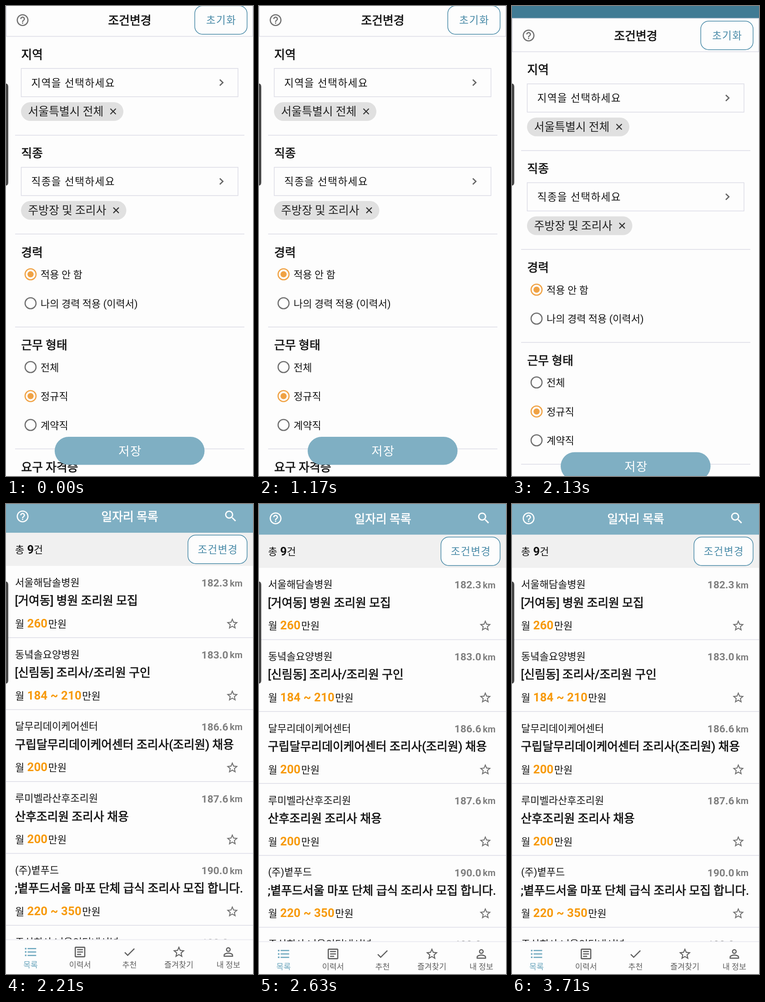
These frames come from a looping animation (543 px wide and 1031 px high, 3.75 s). An HTML page:

```html
<!DOCTYPE html>
<html lang="ko">
<head>
<meta charset="utf-8">
<title>일자리 목록</title>
<style>
html, body { margin: 0; width: 100%; height: 100%; overflow: hidden; background: #fdfdfd; }
svg { display: block; width: 543px; height: 1031px; }
text { font-family: Roboto, "Noto Sans CJK KR", "Noto Sans KR", sans-serif; white-space: pre; }
.m { stroke: currentColor; stroke-width: .75px; }
.b { font-weight: 700; }
.line { stroke: #dcdce6; stroke-width: 1.5; fill: none; }
#form, #list, #hand, .view { animation: 3750ms infinite; }
.view, #hand { animation-timing-function: step-end; }
#form { animation-name: drop; }
#list { animation-name: rise; }
#formView { animation-name: formOn; }
#listView { animation-name: listOn; }
#hand { animation-name: handOn; }
@keyframes drop {
  0%, 51.73% { transform: none; animation-timing-function: cubic-bezier(.4, 0, .2, 1); }
  63.07%, 100% { transform: translateY(48px); }
}
@keyframes rise {
  0%, 51.73% { transform: translateY(-44px); animation-timing-function: cubic-bezier(.4, 0, .2, 1); }
  63.07%, 100% { transform: none; }
}
@keyframes formOn { 0% { visibility: visible; } 57.33%, 100% { visibility: hidden; } }
@keyframes listOn { 0% { visibility: hidden; } 57.33%, 100% { visibility: visible; } }
@keyframes handOn { 0% { opacity: 0; } 40.5% { opacity: 1; } 52.3%, 100% { opacity: 0; } }
</style>
</head>
<body>
<svg id="stage" viewBox="0 0 543 1031"></svg>
<script>
const INK = '#141414', GRAY = '#707070', BLUE = '#7fafc3', EDGE = '#4a8ba8', ORANGE = '#f0a244';

const ICON = {
  help: 'M11 18h2v-2h-2v2zm1-16C6.48 2 2 6.48 2 12s4.48 10 10 10 10-4.48 10-10S17.52 2 12 2zm0 18c-4.41 0-8-3.59-8-8s3.59-8 8-8 8 3.59 8 8-3.59 8-8 8zm0-14c-2.21 0-4 1.79-4 4h2c0-1.1.9-2 2-2s2 .9 2 2c0 2-3 1.75-3 5h2c0-2.25 3-2.5 3-5 0-2.21-1.79-4-4-4z',
  search: 'M15.5 14h-.79l-.28-.27C15.41 12.59 16 11.11 16 9.5 16 5.91 13.09 3 9.5 3S3 5.91 3 9.5 5.91 16 9.5 16c1.61 0 3.09-.59 4.23-1.57l.27.28v.79l5 4.99L20.49 19zm-6 0C7.01 14 5 11.99 5 9.5S7.01 5 9.5 5 14 7.01 14 9.5 11.99 14 9.5 14z',
  star: 'M22 9.24l-7.19-.62L12 2 9.19 8.63 2 9.24l5.46 4.73L5.82 21 12 17.27 18.18 21l-1.63-7.03zM12 15.4l-3.76 2.27 1-4.28-3.32-2.88 4.38-.38L12 6.1l1.71 4.04 4.38.38-3.32 2.88 1 4.28z',
  list: 'M2.5 5h2.5v2.5H2.5zM2.5 10.75h2.5v2.5H2.5zM2.5 16.5h2.5V19H2.5zM7 5.2h14.5v2H7zM7 11h14.5v2H7zM7 16.8h14.5v2H7z',
  article: 'M3 5a2 2 0 0 1 2-2h14a2 2 0 0 1 2 2v14a2 2 0 0 1-2 2H5a2 2 0 0 1-2-2zM5 5v14h14V5zM7 7h10v2H7zM7 11h10v2H7zM7 15h7v2H7z',
  check: 'M9 16.2L4.8 12l-1.4 1.4L9 19 21 7l-1.4-1.4z',
  person: 'M12 5.9a2.1 2.1 0 1 1 0 4.2 2.1 2.1 0 0 1 0-4.2m0 9c2.97 0 6.1 1.46 6.1 2.1v1.1H5.9V17c0-.64 3.13-2.1 6.1-2.1M12 4C9.79 4 8 5.79 8 8s1.79 4 4 4 4-1.79 4-4-1.79-4-4-4zm0 9c-2.67 0-8 1.34-8 4v3h16v-3c0-2.66-5.33-4-8-4z'
};

// Text is placed by its vertical centre.
function text(x, cy, size, str, { fill = INK, cls = '', anchor = 'start', gap = 0 } = {}) {
  return `<text x="${x}" y="${cy + size * .37}" font-size="${size}" fill="${fill}" color="${fill}" class="${cls}" text-anchor="${anchor}" letter-spacing="${gap}">${str}</text>`;
}
const head = (x, cy, str, opt) => text(x, cy, 25.8, str, { cls: 'm', ...opt });
const rect = (x, y, w, h, fill, rest = '') => `<rect x="${x}" y="${y}" width="${w}" height="${h}" fill="${fill}" ${rest}/>`;
const path = (d, color, width) => `<path d="${d}" fill="none" stroke="${color}" stroke-width="${width}"/>`;
const rule = (y, x1 = 20, x2 = 524) => `<path class="line" d="M${x1} ${y}H${x2}"/>`;
const icon = (name, cx, cy, k, fill = GRAY) =>
  `<path transform="translate(${cx} ${cy}) scale(${k}) translate(-12 -12)" fill="${fill}" fill-rule="evenodd" d="${ICON[name]}"/>`;

const outlineButton = (x, y, w, str) =>
  rect(x, y, w, 62.5, '#fdfdfd', `rx="17" stroke="${EDGE}" stroke-width="1.5"`) +
  text(x + w / 2 + .7, y + 31.5, 22.6, str, { fill: EDGE, anchor: 'middle', gap: 1.35 });

function picker(y, title, hint, chip, chipW) {
  const cx = 33 + chipW - 22.5, cy = y + 125.3;
  return head(33.5, y, title) +
    rect(33.5, y + 31, 476.5, 62, '#fdfdfd', 'class="line" style="fill:#fdfdfd"') +
    text(55.5, y + 62.3, 22.6, hint, { gap: 1.4 }) +
    path(`M470 ${y + 55.5}l6.8 6.5-6.8 6.5`, '#666', 2.7) +
    rect(33, y + 105, chipW, 41, '#e0e0e0', 'rx="20.5"') +
    text(48.5, y + 125, 24.8, chip, { fill: '#222' }) +
    path(`M${cx - 6} ${cy - 6}l12 12m0-12l-12 12`, '#333', 2.2) +
    rule(y + 177.5);
}

function radio(y, label, on) {
  const c = on ? ORANGE : GRAY;
  return `<circle cx="54" cy="${y}" r="12" fill="none" stroke="${c}" stroke-width="2.6"/>` +
    (on ? `<circle cx="54" cy="${y}" r="6.8" fill="${c}"/>` : '') +
    text(76, y + .5, 22, label);
}

const form =
  rect(0, -80, 543, 74, '#407b94') + rect(0, -7, 543, 1100, '#fdfdfd') +
  rect(.6, -6.4, 541.8, 73, '#fdfdfd', 'class="line" style="fill:#fdfdfd"') +
  icon('help', 36.5, 31, 1.3) +
  head(272, 31.5, '조건변경', { anchor: 'middle' }) +
  outlineButton(415, -.5, 115, '초기화') +
  picker(106, '지역', '지역을 선택하세요', '서울특별시 전체', 225) +
  picker(322.8, '직종', '직종을 선택하세요', '주방장 및 조리사', 231.5) +
  head(33.5, 540, '경력') +
  radio(588.5, '적용 안 함', true) + radio(652, '나의 경력 적용 (이력서)') + rule(704.3) +
  head(33.5, 743.5, '근무 형태') +
  radio(792, '전체') + radio(855.7, '정규직', true) + radio(919, '계약직') + rule(971.4) +
  head(33.5, 1011, '요구 자격증') +
  rect(107, 945, 329.5, 61.5, BLUE, 'rx="30.7"') +
  text(273, 976, 26.4, '저장', { fill: '#fff', anchor: 'middle', gap: 1.4 });

const jobs = [
  ['서울해담솔병원', '182.3', '[거여동] 병원 조리원 모집', '260'],
  ['동녘솔요양병원', '183.0', '[신림동] 조리사/조리원 구인', '184 ~ 210'],
  ['달무리데이케어센터', '186.6', '구립달무리데이케어센터 조리사(조리원) 채용', '200'],
  ['루미벨라산후조리원', '187.6', '산후조리원 조리사 채용', '200'],
  ['(주)볕푸드', '190.0', ';볕푸드서울 마포 단체 급식 조리사 모집 합니다.', '220 ~ 350'],
  ['주식회사 너울인터내셔널', '190.0', '', '']
];

const job = ([name, km, title, pay], i) => {
  const y = 140 + i * 157.8;
  return text(20, y + 36, 22, name) +
    text(488.5, y + 37, 22.8, km, { fill: '#808080', cls: 'b', anchor: 'end' }) +
    text(520, y + 37.5, 20, 'km', { fill: '#808080', cls: 'b', anchor: 'end' }) +
    head(19.5, y + 76, title) +
    text(20, y + 127, 22, '월') +
    text(46.5, y + 127, 22, `<tspan font-size="26" font-weight="700" fill="#f79a0c">${pay}</tspan><tspan dx="1.5">만원</tspan>`) +
    icon('star', 497.5, y + 127, 1.25) +
    rule(y + 157.4, 0, 543);
};

const tabs = [['list', '목록'], ['article', '이력서'], ['check', '추천'], ['star', '즐겨찾기'], ['person', '내 정보']];
const tab = ([name, label], i) => {
  const x = 54 + i * 108.7, c = i ? '#606060' : '#6ba6bd';
  return icon(name, x, 987, 1.3, c) + text(x, 1015, 17.4, label, { fill: c, anchor: 'middle' });
};

const list =
  rect(0, -10, 543, 1100, '#fdfdfd') + rect(0, -80, 543, 147.5, BLUE) +
  icon('help', 36.5, 31.5, 1.3, '#fff') +
  head(272, 32, '일자리 목록', { fill: '#fff', anchor: 'middle' }) +
  icon('search', 494, 31, 1.37, '#fff') +
  rect(0, 67.5, 543, 72.5, '#f0f0f0') +
  text(20, 104, 22, '총') + text(46.5, 104, 25.5, '9', { cls: 'b' }) + text(61, 104, 22, '건') +
  outlineButton(400, 72.5, 130, '조건변경') +
  jobs.map(job).join('') +
  rect(0, 960, 543, 140, '#fdfdfd') + rect(0, 959, 543, 2, '#ececf2') +
  tabs.map(tab).join('');

const hand =
  path('M306 926l12 17M284 957l22 5M290 996l19-10M326 997l-4 21M348 994l12 17', '#1a9cc4', 6) +
  `<path fill="#fbc78f" d="M429 828L467 887 455 904C452 925 446 935 437 944 427 956 412 957 395 949L340 978C326 983 315 969 325 960L366 936C352 938 345 923 357 916 344 917 339 903 351 897 338 895 336 880 347 875L398 845Q410 836 429 828Z"/>` +
  path('M391 949L419 930', '#dfb085', 4);

document.getElementById('stage').innerHTML =
  `<g id="listView" class="view"><g id="list">${list}</g></g>` +
  `<g id="formView" class="view"><g id="form">${form}</g></g>` +
  `<g id="hand">${hand}</g>` +
  `<path d="M0 170Q5 171 5 177V387Q5 393 0 394Z" fill="#484848"/>`;
</script>
</body>
</html>
```
